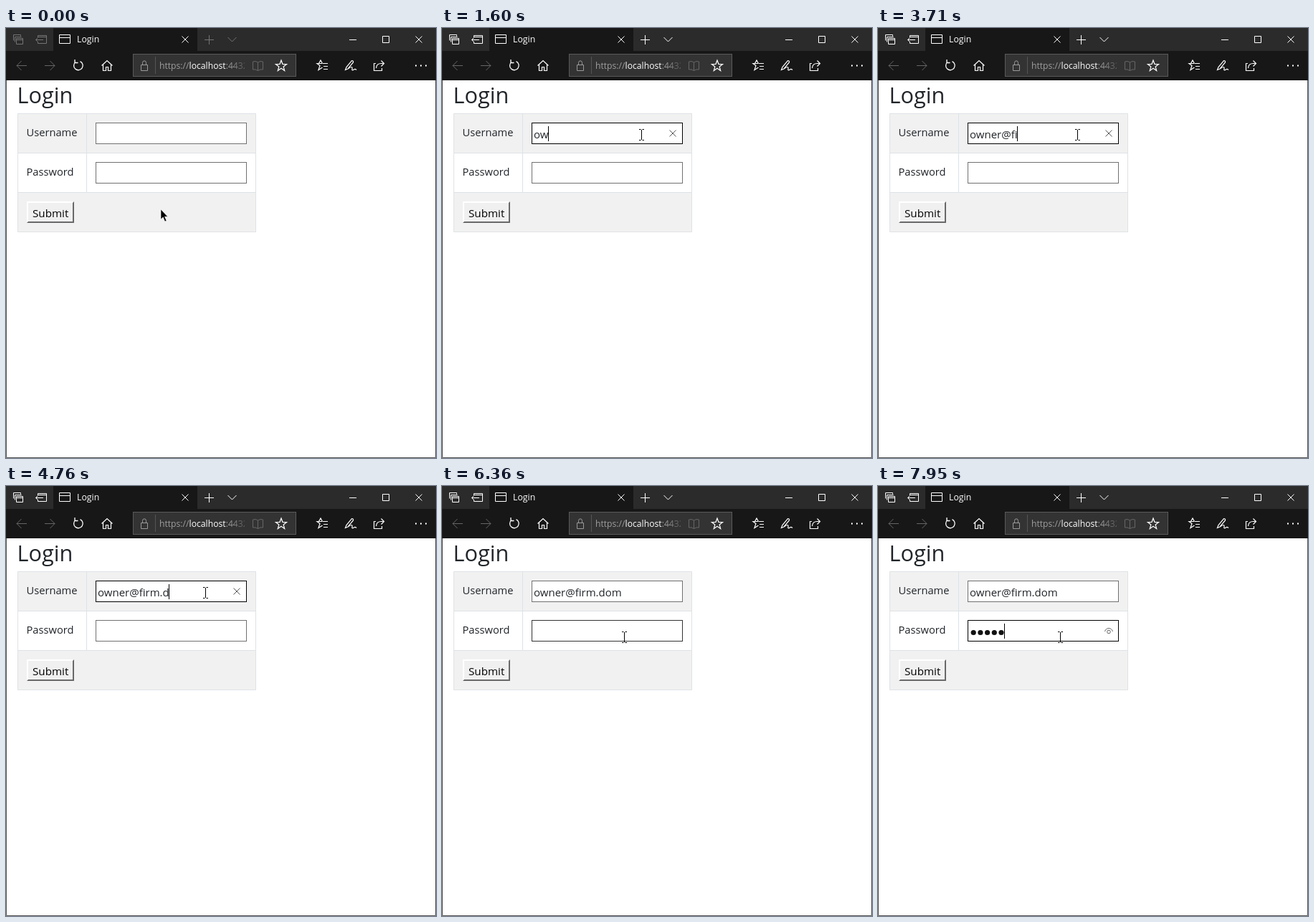
Animation of 600x600 px, one loop 8 s. Source, as an HTML page:

```html
<!DOCTYPE html>
<html lang="en">
<head>
<meta charset="utf-8">
<title>Login</title>
<style>
  html, body { margin: 0; width: 100%; height: 100%; overflow: hidden; background: #fff; }
  svg { display: block; width: 100vw; height: 100vh; }
  text { font-family: "Open Sans", "Noto Sans", sans-serif; white-space: pre; }
  .line { fill: none; stroke: #fff; }
  .dim { stroke: #747474; }
  .faint { stroke: #666; }
  .grid { fill: none; stroke: #dee2e6; }
  .ink { fill: #212529; }
</style>
</head>
<body>
<svg viewBox="0 0 600 600">
  <defs>
    <clipPath id="urlClip"><rect x="210" y="38" width="123" height="28"/></clipPath>
    <linearGradient id="urlFade">
      <stop offset="0" stop-color="#333" stop-opacity="0"/>
      <stop offset="1" stop-color="#333" stop-opacity=".7"/>
    </linearGradient>
  </defs>

  <rect width="600" height="600" fill="#fff"/>
  <rect width="600" height="32" fill="#2b2b2b"/>
  <rect x="66" width="201" height="32" fill="#171717"/>
  <rect y="32" width="600" height="41" fill="#171717"/>
  <path d="M.5 73V599.500H599.500V73" fill="none" stroke="#555"/>

  <!-- title bar -->
  <g id="tabTools" class="line">
    <path d="M10.500 17.500V9.500H20.500V11.500M12.500 19.500V12.500H21.500M14.500 14.500H23.500V22.500H14.500ZM14.500 16.500H23.500"/>
    <path d="M44.500 13V10.500H56.500V21.500H44.500V19M44.500 12.500H56.500M41.500 16.500H52M44.500 13.500L41.500 16.500L44.500 19.500"/>
    <path d="M277 16.500H290M283.500 10V23"/>
    <path d="M309.500 13L315.500 19L321.500 13"/>
  </g>
  <path class="line" d="M74.500 9.500H89.500V21.500H74.500ZM74.500 13.500H89.500"/>
  <text x="99" y="20" font-size="12.300" fill="#fff">Login</text>
  <path class="line" d="M245.500 11.500L254.500 20.500M254.500 11.500L245.500 20.500"/>
  <path class="line" d="M479 16.500H489M525.500 11.500H534.500V20.500H525.500ZM571.500 11.500L580.500 20.500M580.500 11.500L571.500 20.500"/>

  <!-- toolbar -->
  <path class="line faint" d="M29 52.500H15M21.500 46L15 52.500L21.500 59M54 52.500H68M61.500 46L68 52.500L61.500 59"/>
  <path class="line" stroke-width="1.300" d="M97 47.500A6.300 6.300 0 1 0 103.500 46.700M96 44V48.500H100.500"/>
  <path class="line" stroke-width="1.200" d="M133.500 52.500L141 45.500L148.500 52.500M135.500 51V59.500H139.500V54.500H142.500V59.500H146.500V51"/>
  <rect x="177.500" y="36.500" width="227" height="31" fill="#333" stroke="#5a5a5a"/>
  <path class="line" style="stroke:#999" d="M188.500 51.500H197.500V59.500H188.500ZM190.500 51V48.500A2.500 2.700 0 0 1 195.500 48.500V51"/>
  <path d="M208.500 40V64" stroke="#555"/>
  <g clip-path="url(#urlClip)">
    <text x="214" y="57" font-size="12.200" fill="#9d9d9d">https://<tspan fill="#fff">localhost</tspan>:4432</text>
    <rect x="312" y="40" width="22" height="24" fill="url(#urlFade)"/>
  </g>
  <path class="line faint" d="M351.500 48V59.500M351.500 48Q348 45.500 344.500 47V58Q348 57 351.500 59.500Q355 57 358.500 58V47Q355 45.500 351.500 48"/>
  <path id="star" class="line" stroke-width="1.200"/>
  <path class="line" stroke-width="1.200" d="M441 49.500H434L438 52.500L436 58.500L441.500 55M436.500 49.500L439 45L441.500 49.500M442 49.500H449M443 53.500H449M443 57.500H449"/>
  <path class="line" stroke-width="1.200" d="M473.500 58.500L475 54.500L482.500 45.500Q485 45.500 484.500 48L477 57ZM477 57Q484 52 483 57Q482 60 485.500 58Q487 56.500 489 58.500"/>
  <path class="line" stroke-width="1.200" d="M516 49.500H513.500V59.500H524.500V56M516.500 56Q517 49.500 523.500 49.500H527.500M523.500 45.500L527.500 49.500L523.500 53.500"/>
  <path d="M571 51.500h2v2h-2zM578 51.500h2v2h-2zM585 51.500h2v2h-2z" fill="#fff"/>

  <!-- form -->
  <text class="ink" x="15.500" y="105" font-size="30.700">Login</text>
  <path d="M16 119H349V174H16ZM16 229H349V285H16Z" fill="#f1f1f1"/>
  <path class="grid" d="M16.500 119.500H348.500V284.500H16.500ZM16.500 174.500H348.500M16.500 229.500H348.500M112.500 119.500V229.500"/>
  <g class="ink" font-size="14.700">
    <text x="28.500" y="151">Username</text>
    <text x="28.500" y="206">Password</text>
  </g>
  <rect id="userBox" x="125.500" y="132.500" width="210" height="29" fill="#fff"/>
  <rect id="passBox" x="125.500" y="187.500" width="210" height="29" fill="#fff"/>
  <rect x="29" y="242" width="66" height="30" fill="#f0f0f0"/>
  <path d="M29 272V242H95L93 244H31V270Z" fill="#fff"/>
  <path d="M95 242V272H29L31 270H93V244Z" fill="#696969"/>
  <text x="37" y="264" font-size="15.200">Submit</text>

  <text id="userText" class="ink" x="128" y="154" font-size="15"></text>
  <path id="clear" d="M317.500 142.500L326.500 151.500M326.500 142.500L317.500 151.500" stroke="#555"/>
  <g id="dots" fill="#111"></g>
  <g id="eye" fill="none" stroke="#666">
    <path d="M316.500 203Q318 198.500 322 198.500Q326 198.500 327.500 203"/>
    <circle cx="322" cy="203.500" r="2.300"/>
  </g>
  <rect id="caret" width="1" height="21"/>

  <path id="arrow" d="M0 0V14L3.200 11L5.700 17L8 16L5.500 10.300H9.700Z" stroke="#fff" stroke-width=".6"/>
  <path id="beam" d="M-3 -7.500H-.5M1.500 -7.500H4M.5 -7V7M-3 7.500H-.5M1.500 7.500H4" fill="none" stroke="#000"/>
</svg>

<script>
const LOOP = 8000;
const EMAIL = "owner@firm.dom";
const DOT_STEP = 9.7;
const emailKeys = [1350, 1600, 1850, 2120, 2650, 2930, 3460, 3710, 3980, 3980, 4260, 4760, 5010, 5290];
const passKeys = [7430, 7680, 7680, 7950, 7950];

const BORDER = { idle: "#707070", hover: "#333", focus: "#000" };
const userStates = [[0, "idle"], [550, "hover"], [800, "focus"], [6090, "idle"]];
const passStates = [[0, "idle"], [270, "hover"], [550, "idle"], [6360, "hover"], [6630, "focus"]];
const carets = [[0, ""], [800, "user"], [1080, ""], [1350, "user"], [5810, ""],
                [6630, "pass"], [6910, ""], [7430, "pass"]];
const pointers = [
  [0, ["arrow", 216, 253]], [270, ["arrow", 250, 173]], [550, ["beam", 278, 149]],
  [5560, ["arrow", 268, 168]], [5810, ["arrow", 256, 188]],
  [6090, ["beam", 255, 200]], [6360, ["beam", 254, 211]]
];

const el = id => document.getElementById(id);
const set = (id, attrs) => Object.entries(attrs).forEach(([k, v]) => el(id).setAttribute(k, v));
const show = (id, on) => set(id, { visibility: on ? "visible" : "hidden" });
const stateAt = (t, steps) => steps.filter(([start]) => start <= t).pop()[1];
const countAt = (t, keys) => keys.filter(k => k <= t).length;

function starPath(cx, cy, outer, inner) {
  const points = Array.from({ length: 10 }, (_, i) => {
    const r = i % 2 ? inner : outer, a = i * Math.PI / 5 - Math.PI / 2;
    return `${(cx + r * Math.cos(a)).toFixed(2)} ${(cy + r * Math.sin(a)).toFixed(2)}`;
  });
  return `M${points.join("L")}Z`;
}

function render(t) {
  const typed = countAt(t, emailKeys), hidden = countAt(t, passKeys);
  const user = stateAt(t, userStates), caret = stateAt(t, carets);

  set("tabTools", { class: t < 800 ? "line dim" : "line" });
  set("userBox", { stroke: BORDER[user] });
  set("passBox", { stroke: BORDER[stateAt(t, passStates)] });

  const text = el("userText");
  text.textContent = EMAIL.slice(0, typed);
  show("clear", typed > 0 && user === "focus");
  [...el("dots").children].forEach((dot, i) =>
    dot.setAttribute("visibility", i < hidden ? "visible" : "hidden"));
  show("eye", hidden > 0);

  const width = caret === "user" ? (typed ? text.getComputedTextLength() : 0) : hidden * DOT_STEP;
  set("caret", { x: 128 + Math.floor(width), y: caret === "user" ? 137 : 192 });
  show("caret", caret !== "");

  const [shape, x, y] = stateAt(t, pointers);
  show("arrow", shape === "arrow");
  show("beam", shape === "beam");
  set(shape, { transform: `translate(${x} ${y})` });
}

function frame() {
  render(performance.now() % LOOP);
  requestAnimationFrame(frame);
}

set("star", { d: starPath(384, 53, 8, 3.3) });
el("dots").innerHTML = passKeys.map((_, i) =>
  `<circle cx="${133.2 + i * DOT_STEP}" cy="204.500" r="3.600"/>`).join("");
frame();
</script>
</body>
</html>
```
